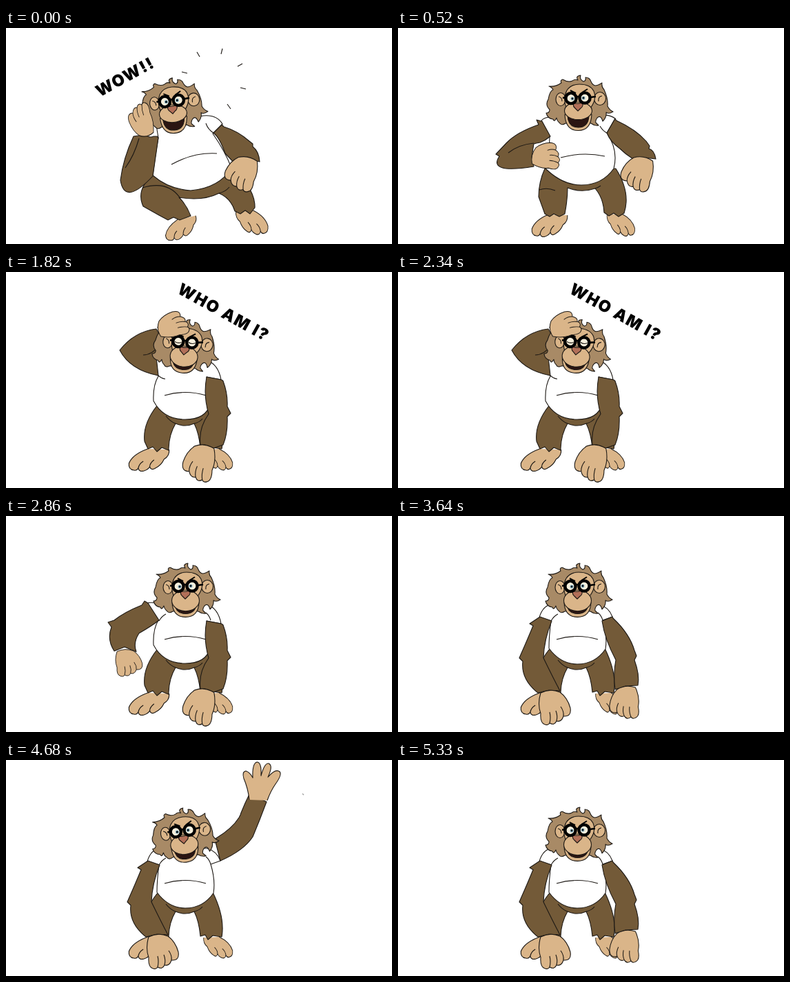
These frames come from a looping animation (560 px wide and 315 px high, 5460 ms). An HTML page:

```html
<!DOCTYPE html>
<html lang="en">
<head>
<meta charset="utf-8">
<style>
html, body { margin: 0; height: 100%; overflow: hidden; background: #fff }
svg { display: block; width: 100%; height: 100% }
path, ellipse, circle { stroke: #1c1814; stroke-width: 1.1; stroke-linejoin: round }
text { font: 900 23.5px Inter, "DejaVu Sans", sans-serif; letter-spacing: 1.7px }
.fur { fill: #735a38 }
.skin { fill: #dab589 }
.hair { fill: #a88a66 }
.line { fill: none }
.thick { fill: none; stroke: #000; stroke-width: 4 }
</style>
</head>
<body>
<svg viewBox="0 0 560 315">
  <defs>
    <g id="hand">
      <path class="skin" d="M-14 2Q-19 18 -14 32Q-15 46 -8 48Q-3 50 -1 46Q6 50 9 43Q16 45 19 36Q31 37 29 24Q25 9 14 1Q0 -5 -14 2Z"/>
      <path class="line" d="M-1 46Q1 38 -1 30M9 43Q11 36 8 28M19 36Q20 29 15 22"/>
    </g>
    <path id="open" class="skin" transform="scale(1 -1)" d="M-13 3Q-15 -14 -21 -28Q-24 -38 -18 -39Q-12 -37 -8 -29Q-9 -50 -2 -52Q5 -52 4 -32Q9 -51 15 -50Q22 -47 14 -30Q25 -43 31 -38Q35 -34 25 -20Q18 -10 13 4"/>
    <g id="foot">
      <path class="skin" d="M-15 0Q-36 8 -41 21Q-42 30 -34 31Q-30 32 -28 28Q-27 34 -20 32Q-14 30 -12 26Q-10 32 -4 28Q4 24 8 15Q16 10 15 1"/>
      <path class="line" d="M-28 28Q-27 22 -21 18M-12 26Q-12 21 -6 16"/>
    </g>
  </defs>

  <use id="footL" href="#foot"/>
  <use id="footR" href="#foot"/>
  <path id="legs" class="fur"/>
  <path id="shirt" fill="#fff"/>
  <path id="armL" class="fur"/>
  <path id="armR" class="fur"/>
  <path id="folds" class="line"/>

  <g id="head">
    <path class="hair" d="M236 80Q234 76 238 75Q246 80 252 77Q256 74 260 76Q256 70 264 69Q262 75 268 78Q272 77 271 72Q277 72 279 78Q281 83 285 84Q289 84 295 80Q294 86 298 90Q304 103 303 114Q306 120 311 122Q305 126 301 123Q302 130 296 136Q293 126 288 131Q285 135 286 138L290 142Q284 143 279 139L242 139Q236 143 233 138Q230 136 229 131Q226 138 224 133Q216 132 214 124Q219 124 219 119Q212 112 217 104Q219 92 224 90Q222 86 218 85Q228 86 236 80Z"/>
    <ellipse class="skin" cx="235" cy="104" rx="7" ry="9.5"/>
    <ellipse class="skin" cx="292" cy="103" rx="8.5" ry="9.5"/>
    <path class="line" d="M232 100Q237 101 237 107M295 99Q289 100 290 107"/>
    <path class="skin" d="M243 116Q238 102 244 91Q250 82 262 82Q278 82 283 92Q288 104 278 117Z"/>
    <path id="jaw" class="skin"/>
    <path id="mouth" fill="#2b1512"/>
    <ellipse id="muzzle" class="skin" cx="260.5" rx="20"/>
    <path fill="#b26f58" d="M254 109Q260 112 267 108Q268 115 264 117L260 121 256 117Q252 114 254 109Z"/>
    <circle cx="250" cy="102.5" r="6" fill="#f6efdc"/>
    <circle cx="270" cy="102" r="6" fill="#f6efdc"/>
    <g id="pupils" stroke="#7faec4">
      <circle cx="252" cy="103" r="2" style="stroke:#7faec4"/>
      <circle cx="268" cy="102" r="2" style="stroke:#7faec4"/>
    </g>
    <path id="lids" class="line" d="M245 103Q250 106 255 103M265 102Q270 105 275 102"/>
    <path class="thick" style="stroke-width:2" d="M249 91L257 95M274 89L266 94"/>
    <circle class="thick" cx="250" cy="102.5" r="7.8"/>
    <circle class="thick" cx="270" cy="102" r="7.8"/>
    <path class="thick" style="stroke-width:2.6" d="M257 101Q260 99 264 101M243 101L238 102M278 101L286 100"/>
  </g>

  <use id="handL" href="#hand"/>
  <use id="handR" href="#hand"/>

  <g id="wow">
    <text transform="translate(136 101)rotate(-29)">WOW!!</text>
    <path class="line" d="M277 35L281 42M314 30L312 38M343 52L336 56M340 87L348 89M321 111L326 118M255 64L263 66"/>
  </g>
  <text id="who" transform="translate(247 30)rotate(29)">WHO AM I?</text>
  <path id="fleck" class="line" style="stroke:#999" d="M430 49L432 51"/>
</svg>
<script>
const FRAME = 130, COUNT = 42;
const $ = id => document.getElementById(id);

// Limbs: "x y rotation scaleX scaleY"; head: "dx dy rotation mouth"
const stand = {
  legs: 'M219 195Q198 222 201 247L206 258 213 255 219 262 226 256 236 260Q236 238 246 221Q260 227 273 221Q280 235 282 257L289 255 293 262 300 256 313 258Q318 230 300 193Z',
  shirt: 'M225 128Q210 130 205 148L222 153Q219 175 219 193Q236 216 260 216Q286 216 301 194Q304 175 297 152L311 147Q306 133 292 129Z',
  armL: 'M206 147L191 157 196 160Q187 182 179 200L176 207 181 212Q178 238 203 258L219 254 235 255Q225 236 211 207Q212 180 223 153Z',
  armR: 'M311 147L312 149 313 150Q336 172 343 196L346 204 343 210Q351 232 348 247L330 248 315 253Q312 230 316 210Q300 180 296 153Z',
  folds: 'M230 180Q260 171 290 180M232 210Q238 218 246 221M273 221Q281 219 285 214M222 153Q226 146 232 143M297 152Q295 145 290 141',
  handL: '221 256 0 1 1', handR: '331 250 -8 -.95 .95',
  footL: '221 258 0 1.04 1', footR: '298 258 0 -.75 .95',
  head: '0 0 0 .15'
};
const reach = { ...stand,
  shirt: 'M225 128Q210 125 205 127L221 152Q213 165 214 188Q228 215 260 215Q290 215 296 193Q298 170 291 153L312 157Q308 135 292 129Z',
  armL: 'M206 127L201 124 197 130Q172 140 157 152L148 155 153 162Q146 180 157 197L172 191 189 198Q184 185 193 171Q212 160 222 152Z',
  armR: 'M312 157L314 158 315 159Q322 178 321 196L326 206 321 211Q322 235 315 252L298 258 282 252Q279 228 294 207Q286 180 291 153Z',
  handL: '173 196 0 .85 .78', handR: '288 254 5 -1 1.07'
};
const think = { ...reach,
  armL: 'M218 124L219 120 220 116Q220 110 221 106L222 105 222 104Q224 100 228 98L222 90 218 83Q186 87 165 114Q180 143 221 151Z',
  folds: 'M230 180Q260 171 290 180M232 210Q238 218 246 221M273 221Q281 219 285 214M222 107Q212 121 199 121M221 151Q225 155 231 156',
  handL: '222 83 -95 .8 .9', head: '-1 0 6 .2'
};
const walk = {
  legs: 'M213 205Q204 225 204 246L213 271 220 275 226 271 234 275 242 271Q246 250 246 233Q266 241 286 234Q298 248 299 269L306 274 313 270 320 275 328 270Q338 240 316 205Z',
  shirt: 'M222 130Q212 130 208 135L220 158Q220 180 213 204Q238 229 266 229Q296 229 313 205Q320 178 303 153L315 132Q306 125 292 128Z',
  armL: 'M209 136L201 134 204 141Q172 152 157 168L142 184 147 187Q130 213 197 202L194 188 197 169Q200 168 206 167Q214 164 221 158Z',
  armR: 'M315 132L316 134 317 135Q345 148 360 165L365 172 364 176Q372 178 374 191L358 189 341 191Q330 184 322 176Q308 166 303 153Z',
  folds: 'M236 189Q268 180 300 187M205 236Q216 232 228 237M286 234Q290 233 294 230M160 182Q175 170 197 168M303 153Q297 150 293 143',
  handL: '196 186 -75 .85 .82', handR: '356 190 8 -1 1',
  footL: '232 272 0 .92 1', footR: '314 271 0 -.72 1',
  head: '1 0 0 1'
};
const sit = {
  legs: 'M213 214Q188 236 199 260L222 273 235 280 243 276 252 280 268 274Q262 258 251 247Q285 253 309 241Q326 248 332 267L340 271 347 266 354 271 361 262Q362 232 323 203Z',
  shirt: 'M224 140Q219 142 219 148L221 160Q216 190 213 215Q236 235 268 237Q310 233 327 204Q318 180 300 154L314 140Q306 126 286 128Z',
  armL: 'M221 160L220 159 219 158Q218 158 216 158L215 158 214 158Q210 160 206 158L198 156 185 158Q170 190 166 222Q172 260 213 216Z',
  armR: 'M313 141L315 143 316 144Q336 150 353 165L358 169 358 173Q367 180 368 195L350 191 332 198Q325 190 318 183Q310 160 301 153Z',
  folds: 'M240 199Q272 181 306 183M198 233Q234 222 252 247M309 241Q318 239 324 232M193 161Q186 186 173 204M301 153Q293 148 290 139',
  handL: '204 156 -190 .75 .97', handR: '351 190 10 -1 1',
  footL: '262 276 -14 .88 .88', footR: '346 266 0 -.83 1.08',
  head: '-19 4 -5 1'
};
const wave = { ...stand,
  armR: 'M303 116L304 115 305 114Q328 100 338 84L340 80 341 77Q347 62 353 50L365 55 378 61Q368 88 358 112Q345 132 311 147Z',
  handR: '366 55 -180 -1 1', head: '-3 1 -6 .5'
};
const waveOut = { ...wave,
  armR: 'M303 117L304 116 305 115Q330 108 344 92L346 88 348 84Q358 70 368 54L380 58 391 67Q380 92 366 114Q352 136 311 147Z',
  handR: '380 60 -160 -1 1'
};
const lift = { ...stand, armR: walk.armR, handR: '357 188 -60 -1 1' };

const keys = [
  [0, sit], [1, sit], [4, walk], [6, walk], [9, reach], [10, reach],
  [12, think], [18, think], [21, reach], [22, reach], [25, stand], [28, stand],
  [29.5, lift], [31, wave], [33, waveOut], [34, wave], [35, waveOut],
  [36, wave], [37, waveOut], [38, wave], [40, lift], [41, stand], [42, stand]
];

function mix(a, b, t) {
  const num = /-?[\d.]+/g, to = b.match(num);
  let i = 0;
  return a.replace(num, v => +(+v + (to[i++] - v) * t).toFixed(2));
}
const show = (id, on) => $(id).style.display = on ? '' : 'none';

function draw(f) {
  const k = keys.findIndex(key => key[0] > f);
  const [f0, a] = keys[k - 1], [f1, b] = keys[k];
  const t = (f - f0) / (f1 - f0);
  const at = part => mix(a[part], b[part], t);

  for (const id of ['legs', 'shirt', 'armL', 'armR', 'folds']) $(id).setAttribute('d', at(id));
  for (const id of ['handL', 'handR', 'footL', 'footR']) {
    const [x, y, r, sx, sy] = at(id).split(' ');
    $(id).setAttribute('transform', `translate(${x} ${y})rotate(${r})scale(${sx} ${sy})`);
  }
  const raised = at('handR').split(' ')[2] < -110;
  $('handR').setAttribute('href', raised ? '#open' : '#hand');

  const [dx, dy, r, m] = at('head').split(' ');
  const chin = 147 + 2.5 * m, lip = 142 + 3 * m, ry = 15.8 - 3 * m;
  $('head').setAttribute('transform', `translate(${dx} ${dy})rotate(${r} 261 110)`);
  $('jaw').setAttribute('d', `M241 126Q242 ${chin} 260.5 ${chin}Q279 ${chin} 280 126Z`);
  $('mouth').setAttribute('d', `M245 128Q246 ${lip} 260.5 ${lip}Q275 ${lip} 276 128Z`);
  $('muzzle').setAttribute('cy', 108 + ry);
  $('muzzle').setAttribute('ry', ry);

  const shut = f >= 12 && f <= 18;
  show('pupils', !shut);
  show('lids', shut);
  show('wow', f < 3);
  show('who', f >= 13 && f < 19);
  show('fleck', f >= 34 && f < 38);
}

function tick() {
  draw(Math.floor(performance.now() / FRAME) % COUNT);
  requestAnimationFrame(tick);
}
tick();
</script>
</body>
</html>
```
